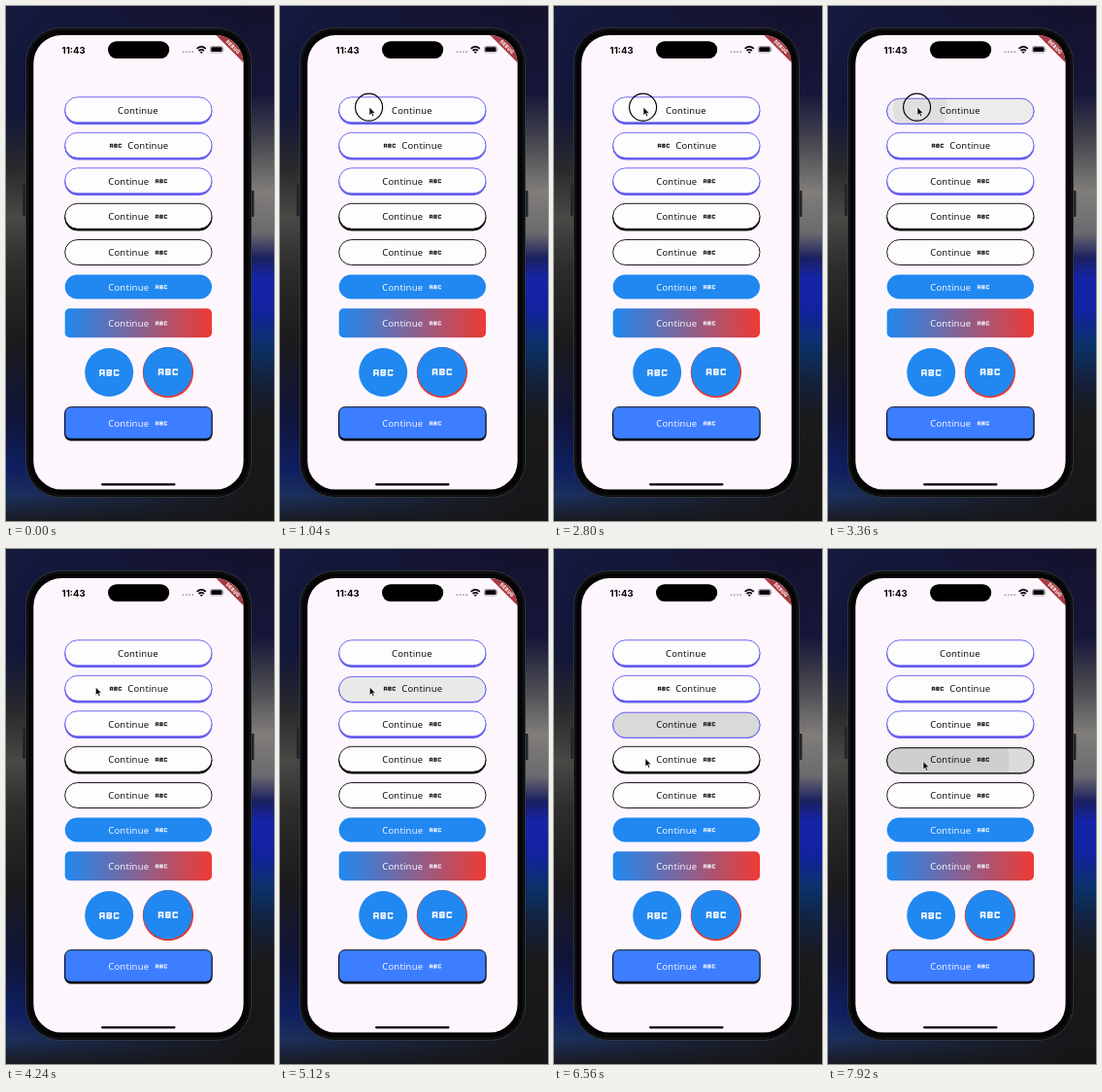
Recreate the animation shown at these times as an HTML page. Size 276 by 530 pixels, loop 8000 ms.

```html
<!DOCTYPE html>
<html lang="en">
<head>
<meta charset="utf-8">
<title>Button showcase</title>
<style>
  html, body { margin: 0; width: 100%; height: 100%; overflow: hidden; }
  body {
    position: relative;
    background: linear-gradient(#151a3e, #12163a 20%, #2a2b2c 32%, #484845 41%, #2c2c2a 51%,
      #1b1b1c 65%, #10153a 80%, #0f1f62 90%, #1b305c 95%, #1a1b22);
  }
  body::before {
    content: ""; position: absolute; inset: 0;
    background: linear-gradient(#14122c, #16163a 17%, #4a4a50 27%, #807d7a 36%, #6c6a6e 44%,
      #1a2060 49%, #1524a8 53%, #1222a0 59%, #0b3268 66%, #14203a 73%, #1a1a1b 80%, #161617);
    -webkit-mask-image: linear-gradient(90deg, transparent 5%, #000 92%);
    mask-image: linear-gradient(90deg, transparent 5%, #000 92%);
  }
  svg { display: block; position: relative; width: 100%; height: 100%; }
  .label { font: 500 9.5px "Noto Sans", "Open Sans", sans-serif; letter-spacing: .16px; fill: #111; }
  .light { fill: #f4f6ff; }
  .clock { font: 700 9.6px Inter, sans-serif; }
  .debug { font: 800 5.2px Roboto, sans-serif; fill: #fff; letter-spacing: .3px; }
</style>
</head>
<body>
<svg viewBox="0 0 276 530">
  <defs>
    <linearGradient id="blend">
      <stop stop-color="#2088f0"/><stop offset="1" stop-color="#ee3b34"/>
    </linearGradient>
    <clipPath id="screen"><rect x="28.3" y="30" width="216.3" height="467.6" rx="29"/></clipPath>
    <path id="abc" transform="translate(-12 -12)" d="M21 11h-1.5v-.5h-2v3h2V13H21v1c0 .55-.45 1-1 1h-3c-.55 0-1-.45-1-1v-4c0-.55.45-1 1-1h3c.55 0 1 .45 1 1zM8 10v5H6.5v-1.5h-2V15H3v-5c0-.55.45-1 1-1h3c.55 0 1 .45 1 1zm-1.5.5h-2V12h2zM13.5 12c.55 0 1 .45 1 1v1c0 .55-.45 1-1 1h-4V9h4c.55 0 1 .45 1 1v1c0 .55-.45 1-1 1zM11 10.5v.75h2v-.75zm2 2.25h-2v.75h2z"/>
  </defs>

  <g fill="#25262a">
    <rect x="17" y="183" width="4" height="33" rx="1"/>
    <rect x="252" y="190" width="3.5" height="27" rx="1"/>
  </g>
  <rect x="20.5" y="22.5" width="232" height="483" rx="36" fill="#050506" stroke="#34363b"/>
  <rect x="22.5" y="24.5" width="228" height="479" rx="34" fill="none" stroke="#17181b"/>
  <g clip-path="url(#screen)">
    <rect x="28" y="30" width="217" height="468" fill="#fdf7fd"/>
    <g transform="translate(233.9 42) rotate(45)">
      <rect x="-30" y="-4" width="60" height="8" fill="#a83a42"/>
      <text class="debug" y="1.9" text-anchor="middle">DEBUG</text>
    </g>
  </g>
  <rect x="105" y="36.2" width="63.2" height="17.8" rx="8.9"/>
  <text class="clock" x="57.5" y="48.5">11:43</text>
  <g fill="#aaa6ac">
    <circle cx="182.5" cy="47.3" r="1"/><circle cx="185.8" cy="47.3" r="1"/>
    <circle cx="189" cy="47.3" r="1"/><circle cx="192.2" cy="47.3" r="1"/>
  </g>
  <path d="M196.6 43.8q4.6-3.8 9.2 0M198.5 46q2.7-2.2 5.4 0" fill="none" stroke="#000" stroke-width="1.7"/>
  <path d="M199.6 47.3q1.6-1.2 3.2 0l-1.6 1.7z"/>
  <rect x="210.4" y="41.4" width="13" height="6.6" rx="2" fill="none" stroke="#8a878c" stroke-width=".7"/>
  <rect x="211.3" y="42.3" width="11.2" height="4.8" rx="1.2"/>
  <path d="M224.2 43.6q1.2 1 0 2.2z" fill="#8a878c"/>
  <rect x="98" y="491.2" width="76.6" height="2.2" rx="1.1"/>

  <g id="buttons"></g>
  <g fill="#2088f0">
    <circle cx="106.2" cy="377" r="25"/>
    <circle cx="166.9" cy="377.1" r="26.2" fill="#e8382f"/>
    <circle cx="166.6" cy="376.2" r="25.2"/>
  </g>
  <g fill="#f4f8ff">
    <use href="#abc" transform="translate(106.3 377.3) scale(1.13)"/>
    <use href="#abc" transform="translate(166.9 376.6) scale(1.13)"/>
  </g>

  <g id="pointer">
    <circle id="ring" cx="-.4" cy=".2" r="14" fill="none" stroke="#000" stroke-width="1.2"/>
    <path d="M0 0V8.6L2 6.8 3.3 9.8 4.8 9.1 3.5 6.2H6.2Z" stroke="#fff" stroke-width=".7" stroke-linejoin="round"/>
  </g>
</svg>
<script>
const LOOP = 8000, STEP = 80, FADE_IN = 480, FADE_OUT = 320;
const PURPLE = "#6258ef", BLUE = "#2088f0";

const specs = [
  { y: 93.8, edge: PURPLE, lift: 1.7, icon: null, textX: 115 },
  { y: 130.3, edge: PURPLE, lift: 1.7, icon: 113, textX: 125.3 },
  { y: 166.8, edge: PURPLE, lift: 1.7 },
  { y: 203.3, edge: "#000", lift: 1.7 },
  { y: 240.5, edge: "#000", lift: 0 },
  { y: 276.5, h: 25, fill: BLUE, edge: "none", lift: 0, light: true },
  { y: 311.3, h: 30, rx: 5, fill: "url(#blend)", edge: "none", lift: 0, light: true },
  { y: 412.7, h: 32.7, rx: 6, fill: "#3d7dff", edge: "#000", lift: 1.7, light: true }
];

const presses = [
  { button: 0, x: 92, y: 104, down: 1360, up: 1890 },
  { button: 0, x: 92, y: 104, down: 3120, up: 3600 },
  { button: 1, x: 92, y: 142, down: 4300, up: 4930 },
  { button: 2, x: 92, y: 179, down: 5720, up: 6480 },
  { button: 3, x: 98, y: 218, down: 7250, up: LOOP }
];

// time, x, y
const route = [
  [320, 82, 116], [640, 92, 104], [3900, 92, 104], [4200, 92.3, 142],
  [5350, 92.3, 142], [5600, 92, 178], [6400, 92, 178], [6540, 94, 215.5],
  [6900, 94, 215.5], [7200, 98, 218.5]
];

const byId = id => document.getElementById(id);
const clamp = v => Math.max(0, Math.min(1, v));

function make(parent, tag, attrs) {
  const node = document.createElementNS("http://www.w3.org/2000/svg", tag);
  for (const key in attrs) node.setAttribute(key, attrs[key]);
  return parent.appendChild(node);
}

const buttons = specs.map((spec, i) => {
  const { y, h = 26, rx = h / 2, fill = "#fdfdfe", edge, lift, light, icon = 160, textX = 105.3 } = spec;
  const box = { x: 60.7, y, width: 151.3, height: h, rx };
  const root = make(byId("buttons"), "g", { "stroke-width": .9 });
  const clip = make(root, "clipPath", { id: "face" + i });
  make(clip, "rect", box);
  if (lift) make(root, "rect", { ...box, y: y + lift, fill: edge, stroke: edge });
  const face = make(root, "g", {});
  make(face, "rect", { ...box, fill });
  const ink = make(face, "g", { "clip-path": `url(#face${i})` });
  const glow = make(ink, "rect", { ...box, opacity: 0 });
  const splash = make(ink, "circle", { opacity: 0 });
  make(face, "rect", { ...box, fill: "none", stroke: edge });
  const middle = y + h / 2 + (lift ? .4 : .2);
  const cls = light ? "label light" : "label";
  make(root, "text", { class: cls, x: textX, y: middle + 3.5 }).textContent = "Continue";
  if (icon) make(root, "use", {
    href: "#abc", class: cls, transform: `translate(${icon} ${middle}) scale(.68)`
  });
  return { face, glow, splash };
});

function drawPress(t, index) {
  const { face, glow, splash } = buttons[index];
  const press = presses.find(p => p.button === index && t >= p.down && t < p.up + FADE_OUT);
  if (!press) {
    glow.setAttribute("opacity", 0);
    splash.setAttribute("opacity", 0);
    face.removeAttribute("transform");
    return;
  }
  const age = t - press.down, released = Math.max(0, t - press.up);
  const fade = 1 - released / FADE_OUT;
  const level = clamp(age / FADE_IN) * fade;
  const radius = age * .118 + released * 1.2;
  glow.setAttribute("opacity", .135 * level);
  splash.setAttribute("opacity", .055 * fade);
  splash.setAttribute("cx", press.x + radius * .12);
  splash.setAttribute("cy", press.y);
  splash.setAttribute("r", radius);
  face.setAttribute("transform", `translate(0 ${1.4 * clamp(level * 2)})`);
}

function drawPointer(t) {
  const pointer = byId("pointer");
  const visible = t >= route[0][0];
  pointer.style.display = visible ? "" : "none";
  if (!visible) return;
  const next = route.findIndex(stop => stop[0] > t);
  const b = route[next < 0 ? route.length - 1 : next];
  const a = next < 0 ? b : route[next - 1];
  const k = a === b ? 1 : (t - a[0]) / (b[0] - a[0]);
  const e = k * k * (3 - 2 * k);
  pointer.setAttribute("transform", `translate(${a[1] + (b[1] - a[1]) * e} ${a[2] + (b[2] - a[2]) * e})`);
  byId("ring").style.display = t < 3900 ? "" : "none";
}

function draw(now) {
  const t = Math.floor((now % LOOP) / STEP) * STEP;
  for (let i = 0; i < 4; i++) drawPress(t, i);
  drawPointer(t);
}

let start;
function tick(now) {
  start ??= now;
  draw(now - start);
  requestAnimationFrame(tick);
}
draw(0);
requestAnimationFrame(tick);
</script>
</body>
</html>
```
